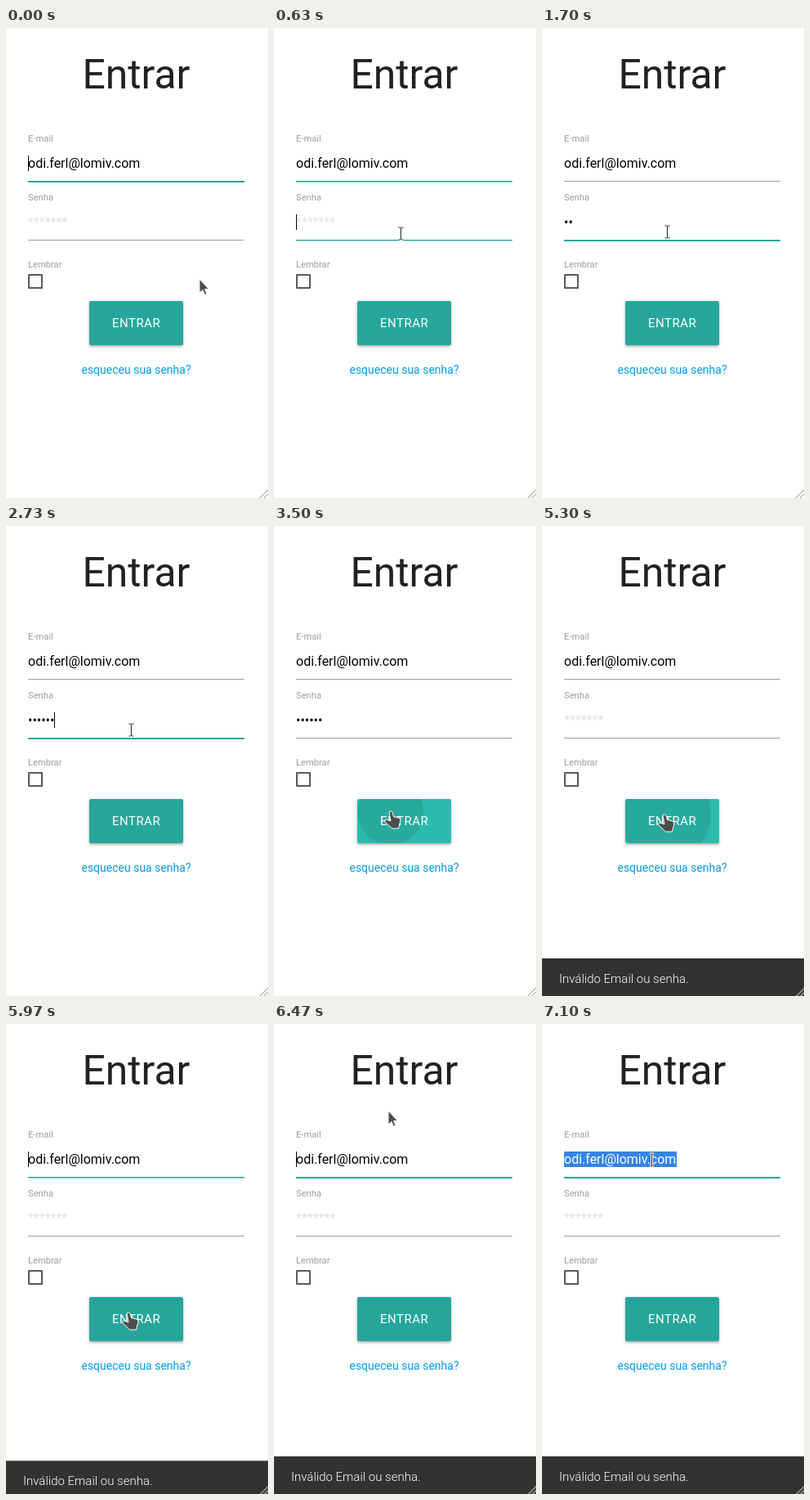
These frames come from a looping animation (321x575 px, 8000 ms). An HTML page:

```html
<!DOCTYPE html>
<html lang="pt">
<head>
<meta charset="utf-8">
<style>
  html, body { margin: 0; width: 100%; height: 100%; overflow: hidden; background: #fff; }
  svg { display: block; font: 16px Roboto, sans-serif; }
  .label { font-size: 11.2px; fill: #9e9e9e; }
  .mid { text-anchor: middle; }
  .line { fill: #9e9e9e; }
  .focus { fill: #26a69a; }
  .raised { filter: drop-shadow(0 2px 1px rgba(0,0,0,.18)) drop-shadow(0 1px 2px rgba(0,0,0,.18)); }
  .pointer path { fill: #4d4d4d; stroke: #fff; stroke-linejoin: round; }
</style>
</head>
<body>
<svg width="321" height="575" viewBox="0 0 321 575">
  <defs>
    <clipPath id="buttonClip"><rect x="102" y="334" width="115" height="54" rx="2"/></clipPath>
    <clipPath id="selectClip"><rect id="selectArea" y="156" height="19"/></clipPath>
  </defs>

  <text class="mid" x="159.5" y="74" font-size="49.84" fill="#212121">Entrar</text>

  <text class="label" x="27" y="139">E-mail</text>
  <text x="27" y="171">odi.ferl@lomiv.com</text>
  <g clip-path="url(#selectClip)">
    <rect x="27" y="156" width="138" height="19" fill="#3584e4"/>
    <text x="27" y="171" fill="#fff">odi.ferl@lomiv.com</text>
  </g>
  <rect class="line" x="27" y="187" width="265" height="1"/>
  <rect class="focus" id="emailFocus" x="27" y="187" width="265"/>

  <text class="label" x="27" y="211">Senha</text>
  <text id="hint" x="27" y="243" fill="#e2e2e2">*******</text>
  <text id="dots" x="27" y="243"></text>
  <rect class="line" x="27" y="259" width="265" height="1"/>
  <rect class="focus" id="passFocus" x="27" y="259" width="265"/>
  <rect id="caret" width="1" height="19"/>

  <text class="label" x="27" y="293">Lembrar</text>
  <rect x="28" y="302" width="16" height="16" fill="none" stroke="#5a5a5a" stroke-width="2" stroke-linejoin="round"/>

  <rect class="raised" id="button" x="102" y="334" width="115" height="54" rx="2"/>
  <g clip-path="url(#buttonClip)"><circle id="ripple" fill-opacity=".09"/></g>
  <text x="130" y="366" font-size="15" letter-spacing=".5" fill="#fff">ENTRAR</text>
  <text class="mid" x="159.5" y="423" font-size="14" fill="#039be5">esqueceu sua senha?</text>

  <g id="toast">
    <rect class="raised" width="321" height="60" fill="#323232"/>
    <text x="21" y="30" font-size="15" font-weight="300" fill="#fff">Inválido Email ou senha.</text>
  </g>
  <g fill="none">
    <path d="M312 575.500L322 565.500M317 575.500L322 570.500" stroke="#fff" stroke-opacity=".7"/>
    <path d="M311 575L321 565M316 575L321 570" stroke="#8c8c8c"/>
  </g>

  <g class="pointer" id="arrow"><path d="M0 0V17L4 13.5L6.5 19.5L9 18.5L6.7 12.5H11.5Z"/></g>
  <g class="pointer" id="hand"><path d="M-3.500 -.500Q-1.500 -3 .500 -.500L2 5L8 6.500Q10.500 7 10.500 9.500L9 15.500L8 19.500H0L-8.500 11.500Q-9.500 8.500 -7 8.500L-1.500 10.500Z"/></g>
  <g id="beam" fill="none">
    <path d="M-3 -7.500H3M-3 7.500H3M0 -7.500V7.500" stroke="#fff" stroke-width="3"/>
    <path d="M-3 -7.500H-1L0 -6.500L1 -7.500H3M-3 7.500H-1L0 6.500L1 7.500H3M0 -6.500V6.500" stroke="#222"/>
  </g>
</svg>

<script>
const LOOP = 8000;
const FOCUS_PASS = 500, TYPE = 1530, KEY_GAP = 290, CLICK_1 = 3150, RELOAD_1 = 4230;
const CLICK_2 = 5035, RELOAD_2 = 5830, SELECT_WORD = 6930, SELECT_ALL = 7100;

const $ = id => document.getElementById(id);
const set = (id, attrs) => {
  for (const name in attrs) $(id).setAttribute(name, attrs[name]);
};
const show = (id, on) => set(id, { visibility: on ? 'visible' : 'hidden' });
const within = (v, a, b) => v >= a && v < b;
const ramp = (t, start, length) => Math.min(1, Math.max(0, (t - start) / length));
const ease = (t, start, length) => {
  const p = ramp(t, start, length);
  return p * p * (3 - 2 * p);
};

function drawCursor(t) {
  const toField = ease(t, 0, 170), nudge = t >= 1170 ? 1 : 0, toButton = ease(t, 2830, 370);
  const shift = ease(t, 4530, 170), leave = t >= 6300 ? 1 : 0, toEmail = ease(t, 6430, 340);
  const x = Math.round(237 - 82 * toField - 2 * nudge - 9 * toButton + 7 * shift - 11 * leave - 6 * toEmail);
  const y = Math.round(307 - 56 * toField - 2 * nudge + 101 * toButton + 4 * shift - 251 * leave + 63 * toEmail);

  const inField = within(x, 27, 292) && (within(y, 145, 188) || within(y, 216, 260));
  const onButton = within(x, 102, 217) && within(y, 334, 388);
  const kind = inField ? 'beam' : onButton ? 'hand' : 'arrow';
  for (const id of ['arrow', 'hand', 'beam']) show(id, id === kind);
  const half = kind === 'arrow' ? 0 : .5;
  set(kind, { transform: `translate(${x + half} ${y + half})` });
}

const drawFocus = (id, amount) => set(id, { height: 1 + amount, opacity: Math.min(1, amount * 3) });

function drawFields(t) {
  const typed = within(t, TYPE - 100, RELOAD_1)
    ? Math.min(6, 2 + Math.floor((t - TYPE) / KEY_GAP)) : 0;
  $('dots').textContent = '•'.repeat(typed);
  show('hint', !typed);

  drawFocus('emailFocus', 1 - ease(t, FOCUS_PASS, 300) + ease(t, RELOAD_1 - 80, 280)
    - ease(t, CLICK_2, 260) + ease(t, RELOAD_2, 260));
  drawFocus('passFocus', ease(t, FOCUS_PASS, 300) - ease(t, CLICK_1, 250));

  const inEmail = t < FOCUS_PASS || within(t, RELOAD_1, CLICK_2) || within(t, RELOAD_2, SELECT_WORD);
  const inPass = within(t, FOCUS_PASS, CLICK_1) && !within(t, 1700, TYPE + KEY_GAP);
  show('caret', inEmail || inPass);
  set('caret', { x: 27 + Math.floor(typed * 5.4), y: inPass ? 228 : 156 });

  const from = t < SELECT_WORD ? 165 : t < SELECT_ALL ? 134 : 27;
  set('selectArea', { x: from, width: 165 - from });
}

function drawButton(t) {
  const hover = t < RELOAD_1 ? ease(t, 3070, 300)
    : t < RELOAD_2 ? ease(t, RELOAD_1 - 80, 300)
    : ramp(t, 5970, 500) * (1 - ramp(t, 6300, 170));
  const mix = (a, b) => Math.round(a + (b - a) * hover);
  set('button', { fill: `rgb(${mix(38, 43)},${mix(166, 187)},${mix(154, 173)})` });

  const again = t >= CLICK_2;
  const radius = again ? (t - CLICK_2) * .211 : Math.max(0, t - CLICK_1) * .115;
  const active = t < RELOAD_1 || within(t, CLICK_2, RELOAD_2);
  set('ripple', { cx: again ? 151 : 143, cy: again ? 353 : 350, r: active ? radius : 0 });
}

function drawToast(t) {
  show('toast', t >= RELOAD_1);
  const drop = t < RELOAD_2 ? 9.4 * (1 - ramp(t, RELOAD_1, 200)) : 7.7 * (1 - ramp(t, RELOAD_2, 470));
  set('toast', { transform: `translate(0 ${529 + drop})` });
}

function frame(now) {
  const t = now % LOOP;
  drawFields(t);
  drawButton(t);
  drawToast(t);
  drawCursor(t);
  requestAnimationFrame(frame);
}
frame(0);
</script>
</body>
</html>
```
